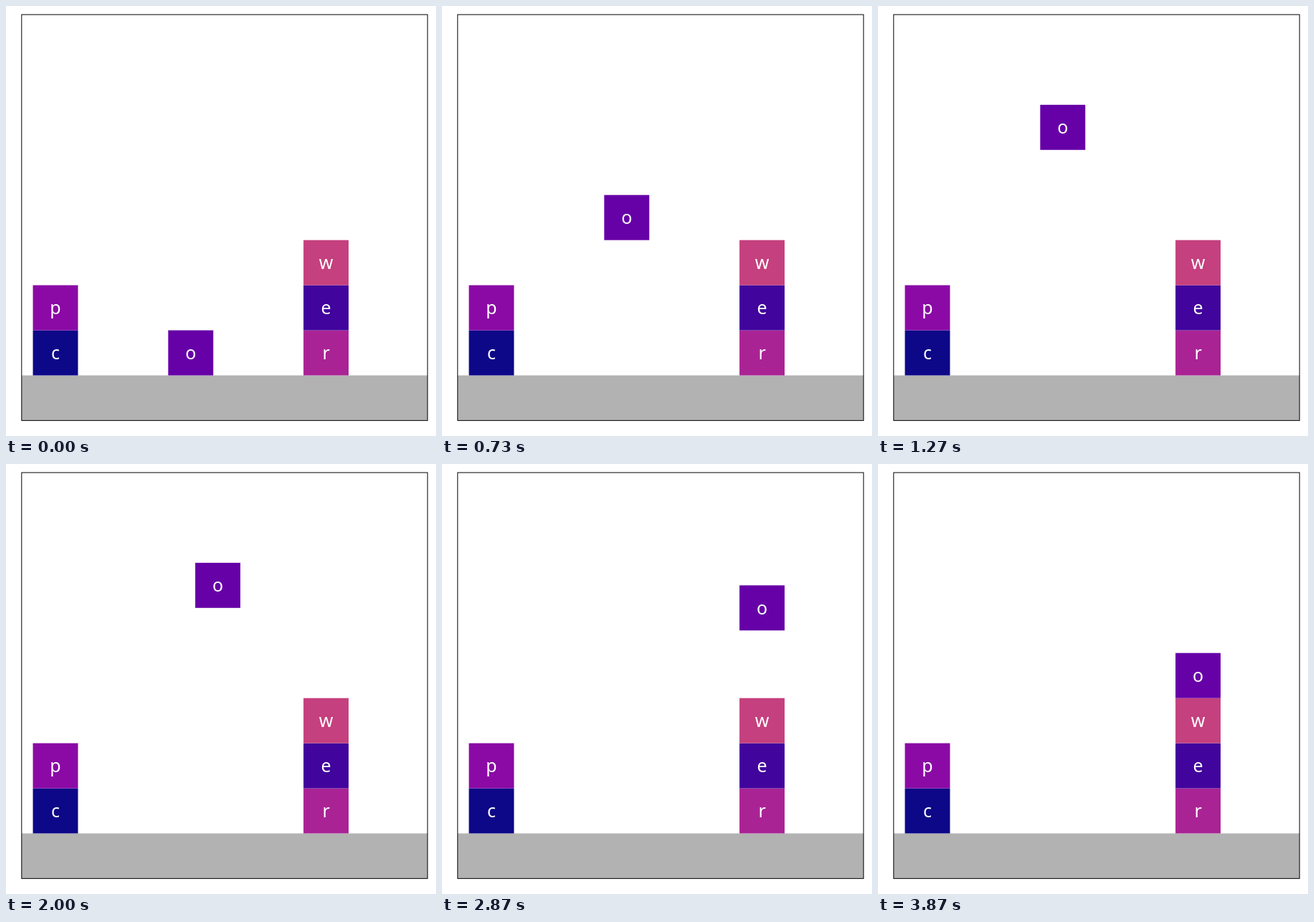
These frames come from a looping animation (600 px wide and 600 px high, 4.87 s). An HTML page:

```html
<!DOCTYPE html>
<html>
<head>
<meta charset="utf-8">
<style>
  html, body { margin: 0; width: 100%; height: 100%; overflow: hidden; background: #fff; }
  svg { display: block; width: 100vw; height: 100vh; }
  text { font: 25px "Noto Sans", "Open Sans", sans-serif; fill: #fff; text-anchor: middle; }
</style>
</head>
<body>
<svg id="stage" viewBox="0 0 600 600"></svg>
<script>
const LOOP = 4870, FPS = 15;
const UNIT = 62.93, LEFT = 21.8, TOP = 12, SIZE = 9 * UNIT;
const GROUND = TOP + SIZE - UNIT;
const stage = document.getElementById('stage');

function add(parent, tag, attrs) {
  const el = document.createElementNS('http://www.w3.org/2000/svg', tag);
  for (const key in attrs) el.setAttribute(key, attrs[key]);
  return parent.appendChild(el);
}

// Columns and levels are counted in block widths.
function place(block, col, level) {
  const x = LEFT + (col + 0.25) * UNIT;
  const y = GROUND - (level + 1) * UNIT;
  block.setAttribute('transform', `translate(${x.toFixed(2)} ${y.toFixed(2)})`);
}

function addBlock(letter, color, col, level) {
  const block = add(stage, 'g', {});
  add(block, 'rect', { width: UNIT, height: UNIT, fill: color });
  add(block, 'text', { x: UNIT / 2, y: 40.5 }).textContent = letter;
  place(block, col, level);
  return block;
}

add(stage, 'rect', { x: LEFT, y: GROUND, width: SIZE, height: UNIT, fill: '#b2b2b2' });
add(stage, 'rect', { x: LEFT, y: TOP, width: SIZE, height: SIZE, fill: 'none', stroke: '#000', 'stroke-width': 1 });

addBlock('c', '#0d0887', 0, 0);
addBlock('p', '#8b0aa5', 0, 1);
addBlock('r', '#aa2395', 6, 0);
addBlock('e', '#41049d', 6, 1);
addBlock('w', '#c5407e', 6, 2);
const mover = addBlock('o', '#6600a7', 3, 0);

// Each move runs over ticks first..last; progress is (tick - origin) / steps.
const moves = [
  { first: 1, origin: -1, steps: 20, from: [3, 0], to: [3, 5] },
  { first: 30, origin: 28, steps: 10, from: [3, 5], to: [6, 5] },
  { first: 38, origin: 38, steps: 20, from: [6, 5], to: [6, 3] }
];

// Ticks start on times rounded to 10 ms.
const tickStart = n => Math.round(n * 100 / FPS) * 10;

function tickAt(ms) {
  let n = Math.floor(ms * FPS / 1000) + 1;
  while (tickStart(n) > ms) n--;
  return n;
}

function position(tick) {
  let pos = [3, 0];
  for (const m of moves) {
    if (tick < m.first) break;
    const p = Math.min(1, (tick - m.origin) / m.steps);
    pos = m.from.map((a, i) => a + (m.to[i] - a) * p);
  }
  return pos;
}

const start = performance.now();
function draw() {
  const ms = Math.max(0, performance.now() - start) % LOOP;
  place(mover, ...position(tickAt(ms)));
  requestAnimationFrame(draw);
}
draw();
</script>
</body>
</html>
```
